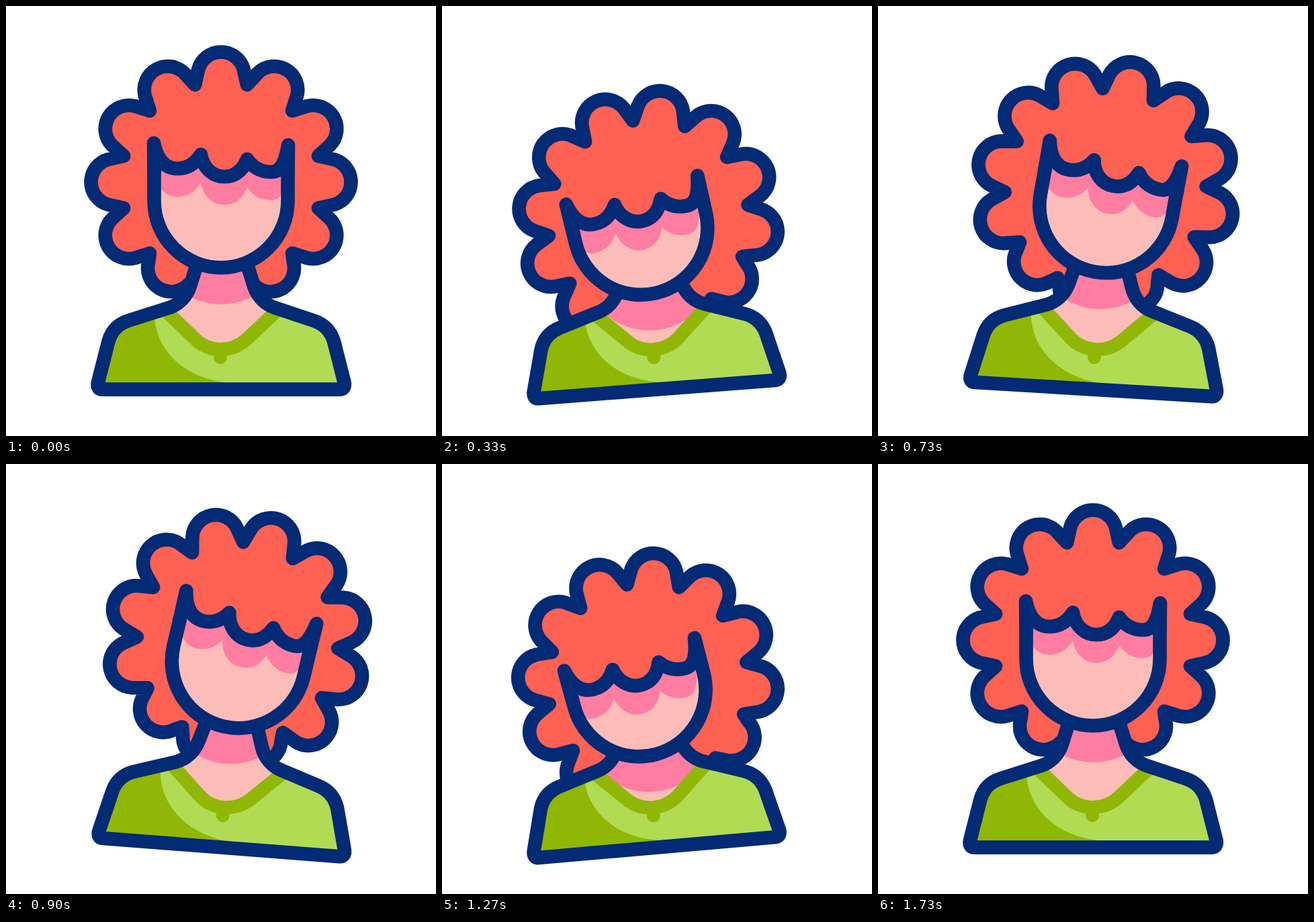
An HTML page for the animation above (2 s loop, 640x640 px).

```html
<!DOCTYPE html>
<html lang="en">
<head>
<meta charset="utf-8">
<title>Swaying curls</title>
<style>
  @property --lean { syntax: '<number>'; inherits: true; initial-value: 0; }
  @property --dip { syntax: '<number>'; inherits: true; initial-value: 0; }

  html, body { margin: 0; height: 100%; overflow: hidden; background: #fff; }

  /* Paused: the script moves through it in steps of 1/30 s */
  svg {
    display: block;
    width: 100vw;
    height: 100vh;
    animation: sway 2s cubic-bezier(.333, 0, .667, 1) infinite paused;
  }

  /* lean: left to right, dip: nod down */
  @keyframes sway {
    0% { --lean: 0; --dip: 0; }
    21.2% { --lean: -1; --dip: 1; }
    41.9% { --lean: 1; --dip: 0; }
    63.35% { --lean: -1; --dip: 1; animation-timing-function: cubic-bezier(.33, 0, .2, 1); }
    84.5%, 100% { --lean: 0; --dip: 0; }
  }

  /* Hair hangs on the head, the head on the body */
  .body {
    transform-origin: 320px 571px;
    transform: rotate(calc(5deg * var(--lean)));
  }
  .head {
    transform-origin: 320px 290px;
    transform:
      translate(calc(5.4px * var(--lean) - 1px * var(--dip)), calc(44.5px * var(--dip)))
      rotate(calc(10deg * var(--lean)));
  }
  .hair {
    transform-origin: 320px 262px;
    transform:
      translate(calc(6px * var(--dip) - 9.5px * var(--lean)), calc(22px * var(--dip)))
      rotate(calc(6deg * var(--lean) - 6deg * var(--dip)));
  }
  .fringe { transform: translateY(calc(30px * var(--dip))); }
  .shade { transform: translate(calc(-9px * var(--dip)), calc(42px + 30px * var(--dip))); }

  .line {
    fill: none;
    stroke: #022a75;
    stroke-width: 20.6;
    stroke-linecap: round;
    stroke-linejoin: round;
  }
  .red { fill: #ff6152; }
  .skin { fill: #fcbdb8; }
  .pink { fill: #ff7da1; }
  .lime { fill: #b1db53; }
  .green { fill: #90b705; }
</style>
</head>
<body>
<svg viewBox="0 0 640 640">
  <defs>
    <path id="torso" d="M283 388 L274 417 C269 432 258 444 243 449 L183 468 C167 473 157 483 152.500 499
      L137 560 C135.500 567 138 570.600 143 570.600 H497 C502 570.600 505 567 503.500 560 L488 499
      C483 483 473 473 457 468 L400 449 C385 444 374 432 369 417 L360 388"/>
    <path id="face" d="M220.500 250 L290 218 L359 222 L419.500 250 V290 A99.500 99.500 0 0 1 220.500 290 Z"/>
    <path id="bangs" d="M220 204 C225 228 237 242 255 242 C270 242 282 234 290 221
      C293 240 307 254 325 254 C341 254 352 245 359 228 C368 241 380 247 395 247 C412 247 417 225 420 207
      L360 185 H290 Z"/>
    <clipPath id="inTorso"><use href="#torso"/></clipPath>
    <clipPath id="inFace"><use href="#face"/></clipPath>
  </defs>

  <g class="body">
    <g class="head">
      <g class="hair"><path id="curls" class="line" style="fill: #ff6152"/></g>
    </g>

    <g clip-path="url(#inTorso)">
      <rect class="skin" x="120" y="380" width="400" height="200"/>
      <circle class="head pink" cx="320.500" cy="344" r="100"/>
      <path class="lime" d="M230 446 L284 498 C304 515.500 336 515.500 357 497 L411 446 H520 V600 H120 V446 Z"/>
      <path class="green" d="M221 440 V460 C222 506 258 556 340 562 V580 H120 V440 Z"/>
      <path d="M232 448 L284 498 C304 515.500 336 515.500 357 497 L409 448"
        fill="none" stroke="#90b705" stroke-width="20"/>
      <circle class="green" cx="319" cy="523" r="10"/>
    </g>
    <use href="#torso" class="line"/>

    <g class="head">
      <use href="#face" class="skin"/>
      <g clip-path="url(#inFace)">
        <use href="#bangs" class="shade pink"/>
      </g>
      <g class="fringe">
        <use href="#bangs" class="red"/>
        <path class="line" d="M220.500 250 L220 204 C225 228 237 242 255 242 C270 242 282 234 290 221
          C293 240 307 254 325 254 C341 254 352 245 359 228 C368 241 380 247 395 247 C412 247 417 225 420 207
          L419.500 250"/>
      </g>
      <path class="line" d="M220.500 245 V290 A99.500 99.500 0 0 0 419.500 290 V245"/>
    </g>
  </g>
</svg>

<script>
  const svg = document.querySelector('svg');

  // Point given by its distance out along a ray and its offset to the side
  function spot(deg, out, side = 0) {
    const a = deg * Math.PI / 180, s = Math.sin(a), c = Math.cos(a);
    const x = 320 + out * s + side * c, y = 262 - out * c + side * s;
    return x.toFixed(2) + ' ' + y.toFixed(2);
  }

  // Twelve round curls; the three lowest sit closer in
  function curls() {
    const r = 35, side = r * Math.cos(Math.PI / 12), rise = r * Math.sin(Math.PI / 12);
    let d = 'M' + spot(-15, 150);
    for (let deg = 0; deg < 360; deg += 30) {
      const out = (Math.abs(deg - 180) <= 30 ? 148 : 158.5) + rise;
      d += `L${spot(deg, out, -side)}A${r} ${r} 0 0 1 ${spot(deg, out, side)}L${spot(deg + 15, 150)}`;
    }
    return d + 'Z';
  }
  document.getElementById('curls').setAttribute('d', curls());

  const step = 1000 / 30, start = performance.now();
  function draw() {
    const t = (performance.now() - start + 5) % 2000;
    svg.style.animationDelay = -Math.floor(t / step) * step + 'ms';
    requestAnimationFrame(draw);
  }
  draw();
</script>
</body>
</html>
```
